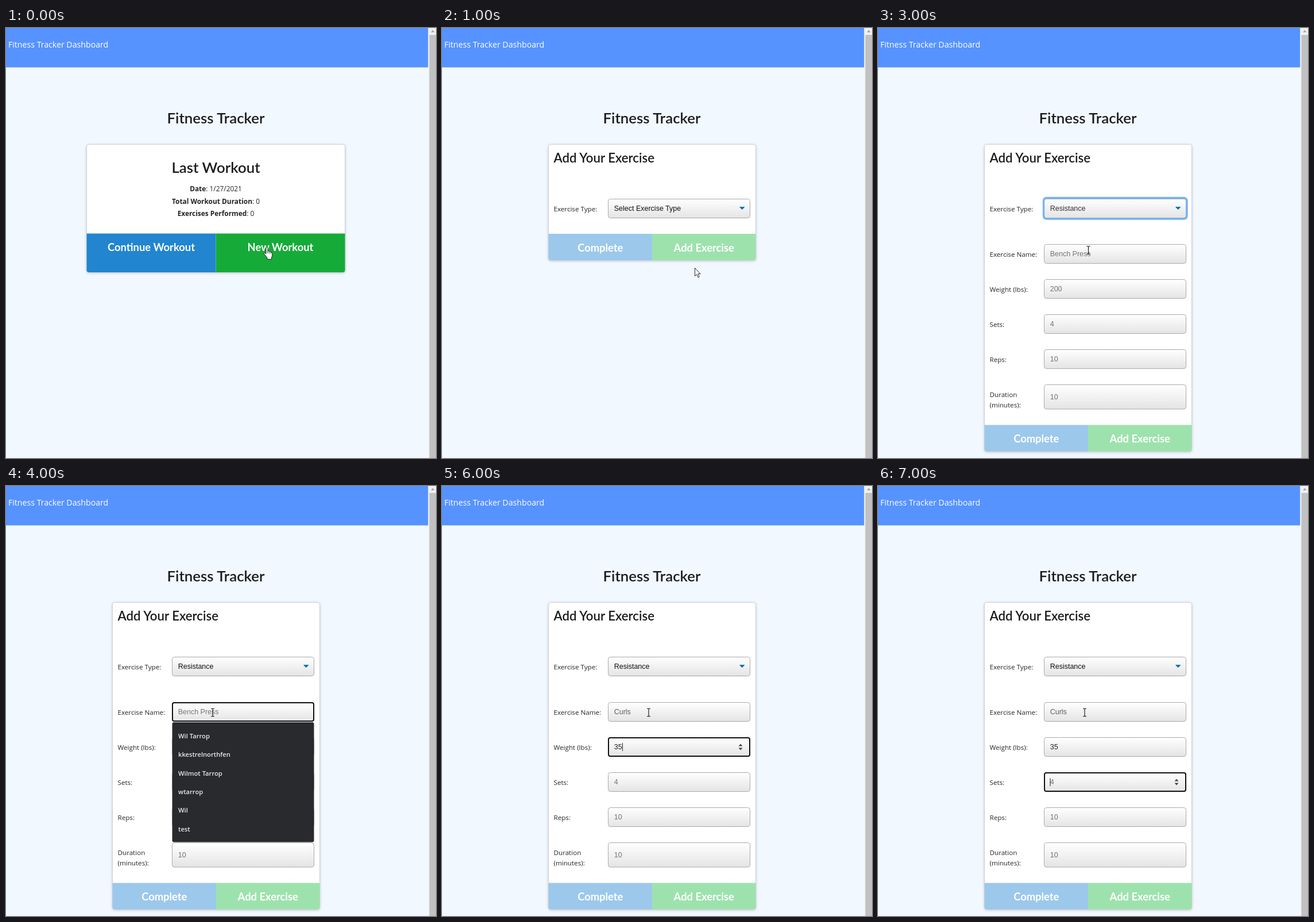
Animation of 749x748 px, one loop 8000 ms. Source, as an HTML page:

```html
<!DOCTYPE html>
<html lang="en">
<head>
<meta charset="utf-8">
<title>Fitness Tracker</title>
<style>
  html, body { margin: 0; width: 100%; height: 100%; overflow: hidden; background: #f2f8ff; }
  svg { display: block; }
  .ui { font: 11.65px "Open Sans", sans-serif; fill: #212529; }
  .stat { font-size: 11.9px; }
  .head { font: 600 25.8px Lato, sans-serif; fill: #1b1c1d; }
  .btn { font: 700 18.35px Lato, sans-serif; fill: #fff; }
  .field { font: 12.5px "Liberation Sans", Arial, sans-serif; fill: #212529; }
  .mid { text-anchor: middle; }
  .bold { font-weight: 700; }
  .card { filter: drop-shadow(0 1px 2px #0003); }
  .popup { filter: drop-shadow(1px 2px 2px #0005); }
</style>
</head>
<body>
<svg width="749" height="748" viewBox="0 0 749 748">
  <defs>
    <linearGradient id="shade" x2="0" y2="1">
      <stop stop-color="#fff"/><stop offset="1" stop-color="#e4e4e4"/>
    </linearGradient>
  </defs>
  <rect width="749" height="748" fill="#f2f8ff"/>
  <rect width="735.5" height="68.5" fill="#5693ff"/>
  <text class="ui" x="4" y="34" style="font-size:14.15px;fill:#fff">Fitness Tracker Dashboard</text>
  <rect x="735.5" width="13.5" height="748" fill="#f1f1f1"/>
  <rect x="737.5" y="12" width="11.5" height="736" fill="#c1c1c1"/>
  <path d="M740 7.5l3.3-4 3.3 4z" fill="#a3a3a3"/>
  <text class="head mid" x="365.5" y="166">Fitness Tracker</text>
  <g id="scene"></g>
</svg>
<script>
const scene = document.getElementById('scene');

const text = (x, y, cls, str, style = '') =>
  `<text x="${x}" y="${y}" class="${cls}" style="${style}">${str}</text>`;
const rect = (x, y, w, h, fill, extra = '') =>
  `<rect x="${x}" y="${y}" width="${w}" height="${h}" fill="${fill}" ${extra}/>`;

// Card whose footer is split into two buttons; side mirrors the rounded corner.
function card(x, w, split, bottom, labels, colors) {
  const half = w / 2, mid = x + half, top = 202.5;
  const button = (side, i) =>
    `<path d="M${mid} ${split}h${side * half}V${bottom - 4}q0 4 ${-4 * side} 4H${mid}z" fill="${colors[i]}"/>` +
    text(mid + side * half / 2, split + 30.5, 'btn mid', labels[i]);
  return rect(x, top, w, bottom - top, '#fff', 'rx="4" stroke="#d0d2d6" class="card"') +
    button(-1, 0) + button(1, 1);
}

const caret = (x, y) => rect(x, y - 7, 1, 14, '#222');

function field(y, label, value, { color = '#757575', focus, spin, h = 34, caretX } = {}) {
  const mid = y + h / 2;
  const box = focus
    ? rect(290, y + 1, 246, h - 2, 'url(#shade)', 'rx="3" stroke="#101010" stroke-width="2"')
    : rect(289.5, y + .5, 247, h - 1, 'url(#shade)', 'rx="4" stroke="#aaa"');
  const arrows = `<path d="M516.5 ${mid - 1.5}l3.5-4 3.5 4zM516.5 ${mid + 1.5}l3.5 4 3.5-4z" fill="#444"/>`;
  return text(194.5, y + 22, 'ui', label) + box +
    text(299.7, mid + 4.2, 'field', value, `fill:${color}`) +
    (spin ? arrows : '') + (caretX ? caret(caretX, mid) : '');
}

function typeSelect(value, focus) {
  const glow = rect(288.5, 295.5, 249.5, 36.5, 'none', 'rx="5" stroke="#78b3f1" stroke-width="3.4"');
  return field(297, 'Exercise Type:', value, { color: focus ? '#333' : '#111' }) + (focus ? glow : '') +
    '<path d="M519 311.5h7.5l-3.75 3.7z" fill="#0b76b5" stroke="#0b76b5" stroke-width="1.2" stroke-linejoin="round"/>';
}

const addCard = (split, bottom) =>
  card(185.5, 361, split, bottom, ['Complete', 'Add Exercise'], ['#9cc8eb', '#9de2ad']) +
  text(194.5, 234, 'head', 'Add Your Exercise', 'font-size:22.2px');

const arrow = (x, y) =>
  `<path transform="translate(${x} ${y})" d="M.5.5v14l3.2-3 2.3 5.3 2.2-1-2.3-5.1h4.3z" fill="#fff" stroke="#111" stroke-width=".9"/>`;
const beam = (x, y) =>
  `<path transform="translate(${x} ${y})" d="M-3-6.7h2.2l.8.7.8-.7H3M0-6V6M-3 6.7h2.2L0 6l.8.7H3" fill="none" stroke="#111" stroke-width="1.1"/>`;
const hand = (x, y) =>
  `<path transform="translate(${x} ${y})" d="M4 11V2q0-1.6 1.5-1.6T7 2v5q2.6-.9 3 .8 2.2-.6 2.6.9 2.2-.3 2.2 1.6v4q0 2-1.4 4v3H6v-2.6L.8 12.5q-.7-1.8.5-2.3 1.2-.4 2.7 1.5zM7 7v4M10 8v3M12.6 9v2.5" fill="#fff" stroke="#111" stroke-width=".9" stroke-linejoin="round"/>`;

function lastWorkout() {
  const row = (y, name, value) =>
    text(365.5, y, 'ui stat mid', `<tspan class="bold">${name}</tspan>: ${value}`);
  return card(140.5, 450, 357.5, 425, ['Continue Workout', 'New Workout'], ['#2185d0', '#16ab39']) +
    text(365.5, 251.5, 'head mid', 'Last Workout') +
    row(284, 'Date', '1/27/2021') +
    row(305.5, 'Total Workout Duration', 0) +
    row(327, 'Exercises Performed', 0) + hand(449, 381);
}

function options() {
  const names = ['Select Exercise Type', 'Resistance', 'Cardio'];
  return rect(290.5, 330.5, 245, 50, '#fff', 'stroke="#767676" class="popup"') +
    rect(291, 331, 244, 17, '#c8c8c8') +
    names.map((name, i) => text(299.7, 343.5 + 16 * i, 'field', name, i ? '' : 'fill:#858585')).join('');
}

function suggestions() {
  const names = ['Wil Tarrop', 'kkestrelnorthfen', 'Wilmot Tarrop', 'wtarrop', 'Wil', 'test'];
  return rect(289.5, 411, 247, 208.5, '#292a2d', 'rx="3"') +
    names.map((name, i) =>
      text(300, 438.7 + 32.4 * i, 'ui', name, 'font-size:11.2px;font-weight:600;fill:#e8eaed')).join('');
}

function form({ selectFocus, name, weight = {}, sets = {} }) {
  return addCard(690.5, 736.5) + typeSelect('Resistance', selectFocus) +
    field(376, 'Exercise Name:', name.value || 'Bench Press', name) +
    field(437, 'Weight (lbs):', weight.value || '200', weight) +
    field(498, 'Sets:', '4', sets) +
    field(559, 'Reps:', '10') +
    field(620, 'Duration', '10', { h: 43.5 }) +
    text(194.5, 660, 'ui', '(minutes):');
}

const shortForm = focus => addCard(358, 404) + typeSelect('Select Exercise Type', focus);
const curls = { value: 'Curls', color: '#5c5c5c' };
const weight = { value: '35', color: '#222' };

const steps = [
  lastWorkout(),
  shortForm(false) + arrow(440, 417),
  shortForm(true) + options() + arrow(391.5, 322.5),
  form({ selectFocus: true, name: {} }) + beam(366.5, 386.5),
  form({ name: { focus: true } }) + suggestions() + beam(360, 394),
  form({ name: { ...curls, focus: true, caretX: 329 } }) + beam(360, 394),
  form({ name: curls, weight: { ...weight, focus: true, spin: true, caretX: 314 } }) + beam(360, 394),
  form({ name: curls, weight, sets: { focus: true, spin: true, caretX: 299.5 } }) + beam(360, 394),
];

let shown = -1;
function draw(now) {
  const step = Math.floor(now / 1000) % steps.length;
  if (step !== shown) scene.innerHTML = steps[shown = step];
  requestAnimationFrame(draw);
}
draw(performance.now());
</script>
</body>
</html>
```
